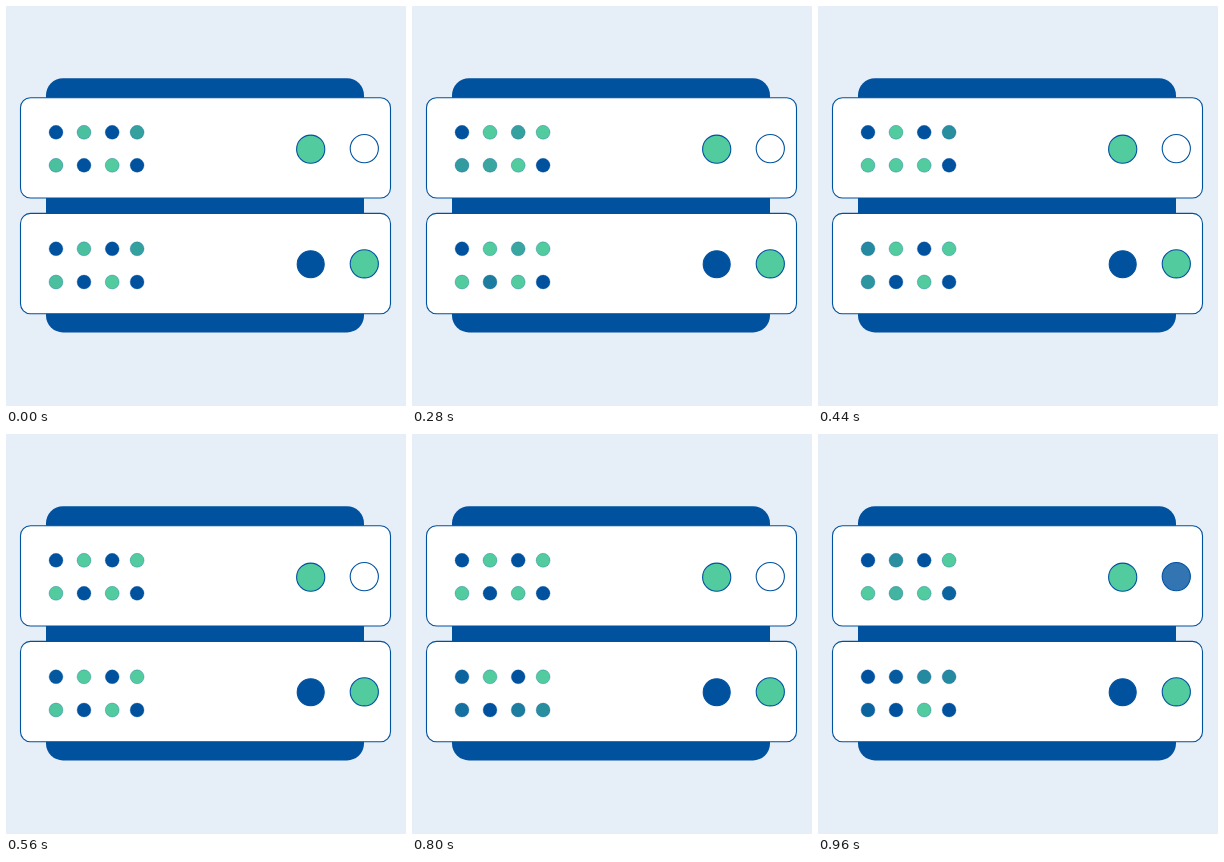
Animation, 400 px wide and 400 px high, one loop 1 s. Source, as an HTML page:

```html
<!DOCTYPE html>
<html lang="en">
<head>
<meta charset="utf-8">
<title>Server lights</title>
<style>
  html, body { margin: 0; width: 100%; height: 100%; overflow: hidden; background: #e6eef8; }
  svg { display: block; width: 100%; height: 100%; }
</style>
</head>
<body>
<svg viewBox="0 0 400 400">
  <rect width="400" height="400" fill="#e6eef8"/>
  <rect x="40" y="72.2" width="318" height="254.2" rx="17" fill="#00529f"/>
  <g fill="#fff" stroke="#00529f" stroke-width="1.1">
    <rect x="14.5" y="91.7" width="370" height="100.3" rx="10"/>
    <rect x="14.5" y="207.4" width="370" height="100.3" rx="10"/>
    <circle cx="304.7" cy="143.2" r="14.1" fill="#52cc9f"/>
    <circle id="lamp" cx="358.3" cy="142.6" r="14.1"/>
    <circle cx="304.7" cy="258.2" r="13.5" fill="#00529f"/>
    <circle cx="358.3" cy="257.8" r="14.1" fill="#52cc9f"/>
  </g>
  <g id="lights" stroke="#00529f" stroke-width=".3"></g>
</svg>
<script>
const LOOP = 1000, STEP = 40, FADE = 80;
const BLUE = [0, 82, 159], GREEN = [82, 204, 159], WHITE = [255, 255, 255];
const columns = [50, 78, 106.2, 131.1];
const rows = [126.3, 159.3, 242.8, 276];

// Moments (ms) at which each light peaks in its other colour, row by row
const blinks = [
  [], [72, 920], [308], [52, 480, 880],
  [72, 328, 880], [304, 440, 976], [712], [1028],
  [484, 868], [72, 966], [304, 1004], [52, 708, 996],
  [72, 484, 680, 820, 972], [332], [828], [840]
];

const group = document.getElementById("lights");

function addDot(x, y) {
  const dot = document.createElementNS("http://www.w3.org/2000/svg", "circle");
  dot.setAttribute("cx", x);
  dot.setAttribute("cy", y);
  dot.setAttribute("r", 6.95);
  group.append(dot);
  return dot;
}

// Neighbouring lights rest in alternating colours
const lights = blinks.map((peaks, i) => {
  const row = Math.floor(i / 4), col = i % 4;
  const [rest, other] = (row + col) % 2 ? [GREEN, BLUE] : [BLUE, GREEN];
  return { dot: addDot(columns[col], rows[row]), peaks, rest, other };
});
lights.push({ dot: document.getElementById("lamp"), peaks: [976], rest: WHITE, other: BLUE });

function mix(from, to, share) {
  return `rgb(${from.map((c, i) => Math.round(c + (to[i] - c) * share))})`;
}

function blinkAt(peaks, t) {
  return Math.max(0, ...peaks.map(peak => 1 - Math.abs(t - peak) / FADE));
}

function draw(now) {
  const t = Math.floor((now % LOOP) / STEP) * STEP;
  for (const { dot, peaks, rest, other } of lights) {
    dot.setAttribute("fill", mix(rest, other, blinkAt(peaks, t)));
  }
}

let start;
function tick(now) {
  start ??= now;
  draw(now - start);
  requestAnimationFrame(tick);
}
draw(0);
requestAnimationFrame(tick);
</script>
</body>
</html>
```
